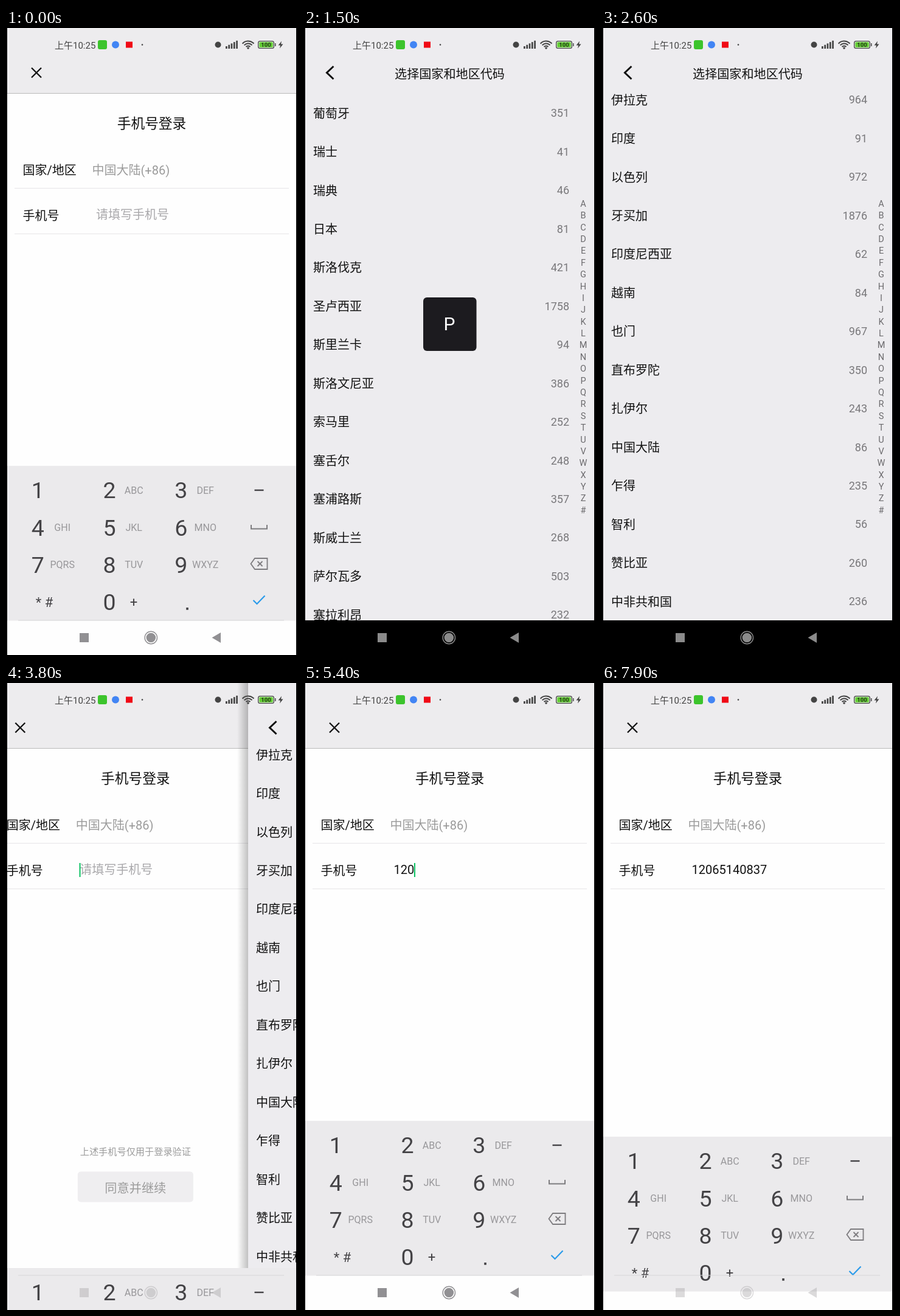
Animation, 480 px wide and 1031 px high, one loop 8000 ms. Source, as an HTML page with a canvas:

```html
<!DOCTYPE html>
<html lang="zh-CN">
<head>
<meta charset="utf-8">
<title>Login</title>
<style>
html, body { margin: 0; width: 100%; height: 100%; overflow: hidden; background: #000; }
canvas { display: block; width: 480px; height: 1031px; }
</style>
</head>
<body>
<canvas id="stage"></canvas>
<script>
const W = 480, H = 1031, LOOP = 8000, STEP = 100;
const LEFT = 2, RIGHT = 477, NAV_TOP = 974;
const FONT = 'Roboto, "Noto Sans CJK SC", "Noto Sans CJK", sans-serif';
const PAGE = '#edecef', INK = '#111', MUTED = '#9b9b9b', KEY_INK = '#444346';

const canvas = document.getElementById('stage');
const ctx = canvas.getContext('2d');
const dpr = window.devicePixelRatio || 1;
canvas.width = W * dpr;
canvas.height = H * dpr;

// Country list by index letter: name and dialling code
const groups = {
  A: '安哥拉 244,阿富汗 93,阿尔巴尼亚 355,阿尔及利亚 213,安道尔共和国 376,安圭拉岛 1264,安提瓜和巴布达 1268,阿根廷 54,阿森松 247,澳大利亚 61,奥地利 43,阿塞拜疆 994',
  B: '巴哈马 1242,巴林 973',
  M: '马来西亚 60,马尔代夫 960,马里 223,马耳他 356,毛里求斯 230,墨西哥 52,摩尔多瓦 373,摩纳哥 377,蒙古 976,摩洛哥 212,莫桑比克 258,缅甸 95',
  N: '纳米比亚 264,瑙鲁 674,尼泊尔 977,尼加拉瓜 505,尼日尔 227,尼日利亚 234,挪威 47,南非 27',
  P: '葡萄牙 351',
  R: '瑞士 41,瑞典 46,日本 81',
  S: '斯洛伐克 421,圣卢西亚 1758,斯里兰卡 94,斯洛文尼亚 386,索马里 252,塞舌尔 248,塞浦路斯 357,斯威士兰 268,萨尔瓦多 503,塞拉利昂 232,苏丹 249,苏里南 597,沙特阿拉伯 966,圣马力诺 378',
  T: '泰国 66,汤加 676,突尼斯 216,土耳其 90,坦桑尼亚 255,塔吉克斯坦 992,土库曼斯坦 993',
  W: '乌干达 256,乌克兰 380,乌拉圭 598,文莱 673,危地马拉 502,委内瑞拉 58',
  X: '新加坡 65,新西兰 64,西班牙 34,希腊 30,匈牙利 36,叙利亚 963',
  Y: '英国 44,约旦 962,意大利 39,伊朗 98,伊拉克 964,印度 91,以色列 972,牙买加 1876,印度尼西亚 62,越南 84,也门 967',
  Z: '直布罗陀 350,扎伊尔 243,中国大陆 86,乍得 235,智利 56,赞比亚 260,中非共和国 236'
};
const rows = [], firstRow = {};
for (const letter in groups) {
  firstRow[letter] = rows.length;
  for (const item of groups[letter].split(',')) rows.push(item.split(' '));
}
const ROW_H = 63.46, ROW_Y = 140;
const MAX_SCROLL = (rows.length - 1) * ROW_H + ROW_Y - 943;

// Letter under the finger while dragging along the index
const drag = [[1200, 'M'], [1400, 'N'], [1500, 'P'], [1600, 'R'], [1700, 'S'], [1900, 'T'],
  [2000, 'W'], [2100, 'X'], [2200, 'Y'], [2300, 'Z'], [2400, '#']];
const DRAG_END = 2600;

const number = '12065140837';
const typedAt = [5000, 5200, 5400, 5700, 5900, 6200, 6300, 6600, 7000, 7400, 7600];

const slideKeys = [[500, 476], [600, 330], [700, 50], [800, 0], [3600, 0], [3700, 150], [3800, 396], [3900, 476]];
const keyboardKeys = [[500, 0], [600, 70], [700, 220], [800, 311], [3700, 311], [3800, 242],
  [3900, 90], [4000, 15], [4100, 0], [7800, 0], [7900, 26], [8000, 120]];

function track(keys, t) {
  if (t <= keys[0][0]) return keys[0][1];
  for (let i = 1; i < keys.length; i++) {
    const [t0, a] = keys[i - 1], [t1, b] = keys[i];
    if (t <= t1) return a + (b - a) * (t - t0) / (t1 - t0);
  }
  return keys[keys.length - 1][1];
}

function rect(x, y, w, h, color) {
  ctx.fillStyle = color;
  ctx.fillRect(x, y, w, h);
}

function roundRect(x, y, w, h, r, color) {
  ctx.fillStyle = color;
  ctx.beginPath();
  ctx.roundRect(x, y, w, h, r);
  ctx.fill();
}

function disc(x, y, r, color) {
  ctx.fillStyle = color;
  ctx.beginPath();
  ctx.arc(x, y, r, 0, 7);
  ctx.fill();
}

function line(points, width, color, close) {
  ctx.strokeStyle = color;
  ctx.lineWidth = width;
  ctx.beginPath();
  points.forEach(([x, y]) => ctx.lineTo(x, y));
  if (close) ctx.closePath();
  ctx.stroke();
}

// y is the visual middle of the glyphs
function text(str, x, y, size, color, align = 'left', weight = 400) {
  const lift = /[\u4e00-\u9fff]/.test(str) ? 0.38 : 0.356;
  ctx.font = `${weight} ${size}px ${FONT}`;
  ctx.textAlign = align;
  ctx.fillStyle = color;
  ctx.fillText(str, x, y + size * lift);
}

function statusBar() {
  const ink = '#444';
  text('上午10:25', 80, 28, 15, ink);
  roundRect(151, 20, 15, 15, 3, '#3cc42c');
  disc(180, 27.5, 6, '#4285f4');
  rect(197, 22.5, 11, 10, '#f00a16');
  disc(224, 27.5, 1.3, ink);
  disc(348.5, 27.5, 5, ink);
  for (let i = 0; i < 5; i++) {
    const h = 4 + i * 2.3;
    rect(361 + i * 4.3, 34 - h, 2.7, h, ink);
  }
  ctx.strokeStyle = ink;
  ctx.lineWidth = 2;
  for (const r of [4.5, 8.5, 12.5]) {
    ctx.beginPath();
    ctx.arc(398, 34, r, -Math.PI * 0.77, -Math.PI * 0.23);
    ctx.stroke();
  }
  disc(398, 33, 1.8, ink);
  roundRect(414, 21, 27, 13, 3.5, ink);
  roundRect(415.3, 22.3, 24.4, 10.4, 2.5, '#e4f4dc');
  roundRect(416.3, 23.3, 22.4, 8.4, 1.5, '#63cd34');
  rect(442, 25, 1.5, 5, ink);
  text('100', 427.5, 27.6, 9.5, '#263a1d', 'center', 700);
  ctx.fillStyle = ink;
  ctx.beginPath();
  [[453, 21.5], [447.5, 28.5], [451, 28.5], [450, 33.5], [455.5, 26.5], [452, 26.5]]
    .forEach(([x, y]) => ctx.lineTo(x, y));
  ctx.fill();
}

function loginPage(t, shift) {
  ctx.save();
  ctx.translate(shift, 0);
  rect(0, 0, W + 40, 107.5, '#edecee');
  rect(0, 107.5, W + 40, H, '#fefefe');
  line([[42, 65.5], [58, 81.5]], 2.3, INK);
  line([[58, 65.5], [42, 81.5]], 2.3, INK);
  text('手机号登录', 239.5, 156, 22.7, INK, 'center');
  text('国家/地区', 27.5, 233, 20, INK);
  text('中国大陆(+86)', 141.5, 233, 20, MUTED);
  text('手机号', 27.5, 308, 20, INK);
  const lineEnd = shift ? 480 : 465;
  rect(14 + shift, 263, lineEnd - 14 - shift, 1, '#e6e5e8');
  rect(14 + shift, 338, lineEnd - 14 - shift, 1, '#e6e5e8');

  const typed = number.slice(0, typedAt.filter(at => t >= at).length);
  if (typed) text(typed, 147.5, 307, 20, INK);
  else text('请填写手机号', 148, 306, 20, '#a9a8ab');
  const caret = (t >= 3700 && t < 4400) || (t >= 5000 && t < 7900);
  if (caret) {
    ctx.font = `20px ${FONT}`;
    rect(147.2 + ctx.measureText(typed).width, 296, 2, 23, '#07c160');
  }

  text('上述手机号仅用于登录验证', 239.5, 770, 15.2, MUTED, 'center');
  roundRect(144.5, 803.5, 190, 50, 5, '#efeef0');
  text('同意并继续', 239.5, 830, 20.2, MUTED, 'center');
  ctx.restore();
}

function listPage(t, x) {
  const current = drag.filter(([at]) => t >= at).pop();
  const letter = current ? current[1] : 'A';
  const target = letter === '#' ? MAX_SCROLL : firstRow[letter] * ROW_H;
  const scroll = Math.min(target, MAX_SCROLL);

  ctx.save();
  ctx.translate(x, 0);
  if (x > 0) {
    const shade = ctx.createLinearGradient(-16, 0, 2, 0);
    shade.addColorStop(0, 'rgba(0,0,0,0)');
    shade.addColorStop(1, 'rgba(0,0,0,0.24)');
    rect(-16, 0, 18, H, shade);
  }
  rect(2, 0, W, H, PAGE);
  line([[48.5, 63], [37.5, 73.5], [48.5, 84]], 3, INK);
  text('选择国家和地区代码', 239.5, 75, 20.1, INK, 'center');

  ctx.save();
  ctx.beginPath();
  ctx.rect(2, 106, W, NAV_TOP - 106);
  ctx.clip();
  rows.forEach(([name, code], i) => {
    const y = ROW_Y + i * ROW_H - scroll;
    if (y < 90 || y > 990) return;
    text(name, 15, y, 20, INK);
    text(code, 436, y, 18, '#78777a', 'right');
  });
  ctx.restore();

  [...'ABCDEFGHIJKLMNOPQRSTUVWXYZ#'].forEach((ch, i) =>
    text(ch, 459, 288.7 + i * 19.385, 14.5, '#6b6a6d', 'center'));
  if (current && t < DRAG_END) {
    roundRect(196, 443, 87.5, 88, 6, '#1c1b1f');
    text(letter, 239, 486.5, 30, '#fff', 'center');
  }
  ctx.restore();
}

const keyLabels = ['', 'ABC', 'DEF', 'GHI', 'JKL', 'MNO', 'PQRS', 'TUV', 'WXYZ'];
const keyX = col => 52.3 + col * 117.8;
const keyY = row => 760 + row * 61.2;

function keyboard(t, offset) {
  ctx.save();
  ctx.translate(0, offset);
  rect(0, 720, W, 254.5, '#ebeaec');

  const pressed = typedAt.findIndex(at => t === at - STEP);
  if (pressed >= 0) {
    const n = +number[pressed];
    const col = n ? (n - 1) % 3 : 1, row = n ? Math.floor((n - 1) / 3) : 3;
    rect(4 + col * 117.7, 729.5 + row * 61.2, 117.7, 60.5, '#dddcdf');
  }

  keyLabels.forEach((label, i) => {
    const col = i % 3, row = Math.floor(i / 3);
    text(String(i + 1), keyX(col), keyY(row), 37.5, KEY_INK, 'center');
    text(label, 92.7 + col * 117.5, keyY(row), 16, '#98979a', 'center');
  });
  text('* #', 63, 944, 22, KEY_INK, 'center');
  text('0', keyX(1), 944, 37.5, KEY_INK, 'center');
  text('+', 210, 944.5, 22, KEY_INK, 'center');
  rect(296.2, 953, 3.6, 3.8, KEY_INK);

  rect(408.5, 758.8, 15, 2.4, KEY_INK);
  line([[403, 817], [403, 823.5], [429, 823.5], [429, 817]], 2, '#7d7c7f');
  line([[402.5, 881], [409, 872], [429.5, 872], [429.5, 890], [409, 890]], 1.8, '#7d7c7f', true);
  line([[413.5, 877], [421.5, 885]], 1.8, '#7d7c7f');
  line([[421.5, 877], [413.5, 885]], 1.8, '#7d7c7f');
  line([[406.5, 941], [412.5, 947], [425.5, 933.5]], 2.2, '#2a9bea');
  ctx.restore();
}

function navIcons(color, alpha) {
  ctx.save();
  ctx.globalAlpha = alpha;
  rect(121, 995, 15, 15, color);
  disc(238.3, 1002.5, 7.8, color);
  ctx.strokeStyle = color;
  ctx.lineWidth = 1.4;
  ctx.beginPath();
  ctx.arc(238.3, 1002.5, 10.2, 0, 7);
  ctx.stroke();
  ctx.fillStyle = color;
  ctx.beginPath();
  [[338.5, 1002.5], [353, 994], [353, 1011]].forEach(([x, y]) => ctx.lineTo(x, y));
  ctx.fill();
  ctx.restore();
}

function draw(t) {
  const slide = track(slideKeys, t);
  const drop = track(keyboardKeys, t);
  const dark = t >= 800 && t < 3700;

  ctx.setTransform(dpr, 0, 0, dpr, 0, 0);
  rect(0, 0, W, H, '#000');
  ctx.save();
  ctx.beginPath();
  ctx.rect(LEFT, 0, RIGHT - LEFT, H);
  ctx.clip();
  if (slide > 0) loginPage(t, -(476 - slide) / 3);
  if (slide < 476) listPage(t, slide);
  statusBar();
  rect(0, NAV_TOP, W, H - NAV_TOP, dark ? '#000' : '#fefefe');
  if (drop < 311) keyboard(t, drop);
  if (!dark) rect(20, 973.5, 437, 1, '#d8d7da');
  navIcons(dark ? '#8b8b8b' : '#919093', dark || drop === 0 ? 1 : 0.32);
  ctx.restore();
}

const start = performance.now();
function frame() {
  const t = (performance.now() - start) % LOOP;
  draw(Math.floor(t / STEP) * STEP);
  requestAnimationFrame(frame);
}
frame();
</script>
</body>
</html>
```
